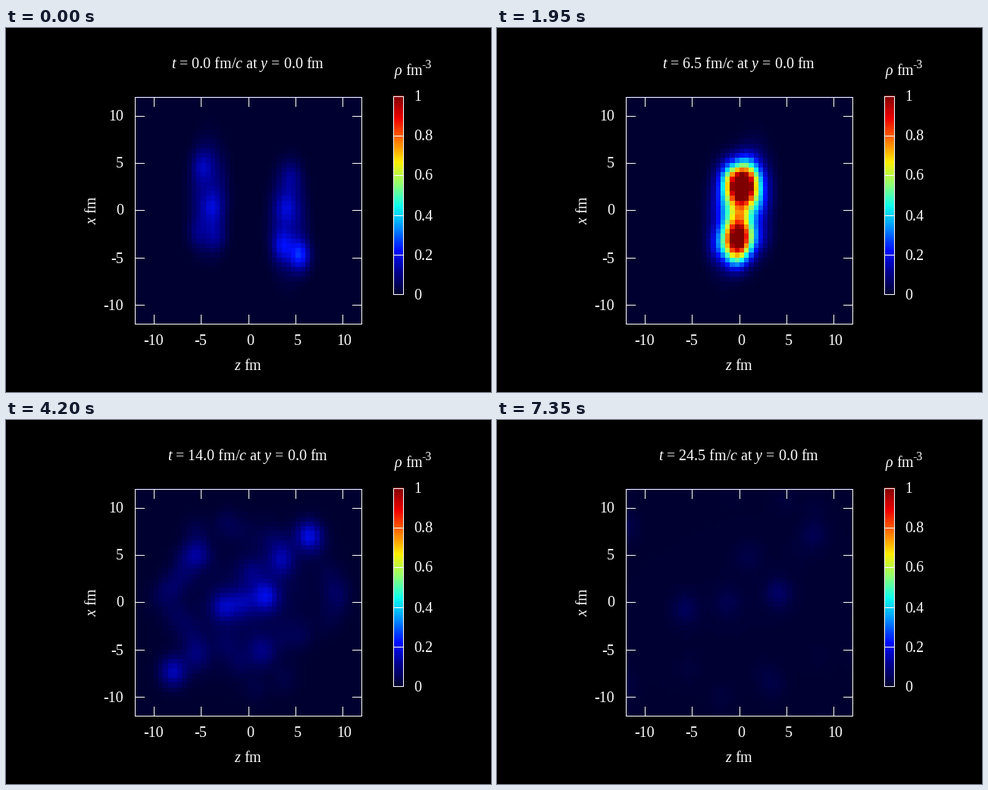
A matplotlib script that plays this animation: 640x480 px, repeating every 7500 ms.

```python
import numpy as np
import matplotlib.pyplot as plt
from matplotlib.animation import FuncAnimation
from matplotlib.colors import LinearSegmentedColormap

plt.rcParams.update({
    "font.family": "Liberation Serif",
    "mathtext.fontset": "custom",
    "mathtext.rm": "Liberation Serif",
    "mathtext.it": "Liberation Serif:italic",
    "mathtext.default": "rm",
})

W, H, DPI = 640, 480, 100
FRAMES, STEP = 50, 0.5
PX = 72 / DPI
LEFT, RIGHT, TOP, BOTTOM = 170, 469, 90, 389
BAR_L, BAR_R, BAR_T, BAR_B = 511, 524, 89, 350
SPEED = 0.9
T0 = 11.5          # time at which the expanding clusters are placed

palette = LinearSegmentedColormap.from_list("density", [
    "#000030", "#000090", "#000fff", "#0090ff", "#0fffee",
    "#90ff70", "#ffee00", "#ff7000", "#ee0000", "#7f0000"], N=256)

axis = np.arange(-11.75, 12, 0.5)
Z, X = np.meshgrid(axis, axis)

# Bright spots as (z, x, density)
right_spots = [(-4.9, 4.7, .08), (-3.8, .3, .09), (-5.4, -2.5, .06), (-3.4, -2.8, .07)]
left_spots = [(4.5, 3.6, .07), (4, .2, .09), (3.6, -3.8, .13), (5.5, -4.8, .2)]
clusters = [
    (4.5, 6, .28), (-5.6, -6.3, .23),                 # fast remnants
    (1.3, .5, .25), (-.4, 0, .14), (-1.8, -.4, .19),  # tilted centre
    (2.5, 3.8, .16), (.3, 2.6, .1), (-3.8, 4.4, .11),
    (-3.9, -4.6, .09), (1.1, -4.6, .1), (-5.8, 1.3, .07)]

rng = np.random.default_rng(4)
angle = 2.4 * np.arange(26)
reach = np.sqrt(rng.uniform(.15, 1, 26))
clusters += list(zip(6.8 * reach * np.cos(angle), 8 * reach * np.sin(angle),
                     rng.uniform(.02, .06, 26)))


def blob(z, x, sz, sx, a):
    return a * np.exp(-((Z - z) / sz) ** 2 / 2 - ((X - x) / sx) ** 2 / 2)


def nucleus(z, x, spots, shift):
    """Flattened body with bright spots, moved along z."""
    r2 = ((Z - z - shift) / 2) ** 2 + ((X - x) / 5.6) ** 2
    return .1 * np.exp(-r2 ** 1.5) + sum(
        blob(sz + shift, sx, .75, 1.15, a) for sz, sx, a in spots)


def contact():
    """Thin layer where the nuclei first touch."""
    layer = .36 * np.exp(-(Z / .55) ** 2 / 2 - ((X + .6) / 4.2) ** 4)
    return layer + blob(0, .1, 1.2, 1.3, .17)


def fireball(t):
    grow = max(0, t - 6.5)
    drift, size = .22 * grow, 1 + .06 * grow
    return (blob(.25 + drift, 2.5, 1.22 * size, 1.6 * size, 1.25)
            + blob(-.15 - drift, -2.9, 1.1 * size, 1.55 * size, 1.05)
            + blob(0, -.3, .9, .9, .15))


def expansion(t):
    """Clusters carried outwards while they thin out."""
    fz, fx = (t - 5.5) / (T0 - 5.5), (t + 3.5) / (T0 + 3.5)
    thin = min(1, fz ** -1.3)
    cloud = .085 * min(1, fz ** -2) * np.exp(
        -((Z / fz - .25 * X / fx) / 3.2) ** 2 / 2 - (X / fx / 4) ** 2 / 2)
    return cloud + sum(blob(z * fz, x * fx, .95, 1.1, a * thin)
                       for z, x, a in clusters)


def density(t):
    rho = np.zeros_like(Z)
    if t < T0:
        beams = (nucleus(-4.2, 1.6, right_spots, SPEED * t)
                 + nucleus(4.2, -1.2, left_spots, -SPEED * t))
        rho += beams * np.interp(t, [3, 6.5, T0], [1, .8, 0])
        rho += contact() * np.interp(t, [.8, 2.5, 5.5], [0, 1, 0])
        rho += fireball(t) * np.interp(t, [2.5, 4, 5.5, 6.5, 8.5, T0],
                                       [0, .5, 1, 1, .5, 0])
    if t > 6.5:
        rho += expansion(t) * np.interp(t, [6.5, T0], [0, 1])
    return rho


fig = plt.figure(figsize=(W / DPI, H / DPI), dpi=DPI, facecolor="black")
ax = fig.add_axes([0, 0, 1, 1])


def label(x, y, s, size=20, **kw):
    kw = {"va": "baseline", **kw}
    return ax.text(x, y, s, color="white", fontsize=size * PX, **kw)


def line(x, y):
    # offsets make each stroke snap onto its pixel row or column
    ax.plot(np.add(x, .25), np.add(y, .75), color="white", lw=PX,
            antialiased=False, solid_capstyle="projecting", zorder=3)


def frame(x0, x1, y0, y1):
    line([x0, x1, x1, x0, x0], [y0, y0, y1, y1, y0])


def heat(data, x0, x1, y0, y1):
    return ax.imshow(data, cmap=palette, vmin=0, vmax=1, origin="lower",
                     extent=(x0, x1 + 1, y1 + 1, y0), aspect="auto",
                     interpolation="nearest")


field = heat(density(0), LEFT, RIGHT, TOP, BOTTOM)
heat(np.linspace(0, 1, 256)[:, None], BAR_L, BAR_R, BAR_T, BAR_B)
frame(LEFT, RIGHT, TOP, BOTTOM)
frame(BAR_L, BAR_R, BAR_T, BAR_B)

for v in range(-10, 11, 5):
    part = (v + 12) / 24
    px = LEFT + round(part * (RIGHT - LEFT))
    py = BOTTOM - round(part * (BOTTOM - TOP))
    for edge, inner in ((BOTTOM, -12), (TOP, 12)):
        line([px, px], [edge, edge + inner])
    for edge, inner in ((LEFT, 12), (RIGHT, -12)):
        line([edge, edge + inner], [py, py])
    label(px + (2.5 if v >= 0 else 0), 418, str(v), ha="center")
    label(155, py + 7.5, str(v), ha="right")

for k in range(6):
    py = BAR_B - round(k / 5 * (BAR_B - BAR_T))
    line([BAR_L, BAR_R], [py, py])
    label(538.7, py + 7.5, f"{k / 5:g}")

label(319, 451, r"$\mathit{z}$ fm", ha="center")
label(124, 240, r"$\mathit{x}$ fm", rotation=90, ha="right", va="center")
label(512.5, 62, r"$\mathit{\rho}$ fm")
label(548, 53, "-3", 16)
title = label(319.5, 53.5, "", ha="center")

ax.set_xlim(0, W)
ax.set_ylim(H, 0)
ax.axis("off")


def draw(i):
    t = i * STEP
    field.set_data(density(t))
    title.set_text(rf"$\mathit{{t}}$ = {t:.1f} fm/$\mathit{{c}}$ at "
                   r"$\mathit{y}$ = 0.0 fm")
    return field, title


anim = FuncAnimation(fig, draw, frames=FRAMES, interval=150, repeat=True,
                     repeat_delay=0)
plt.show()
```
